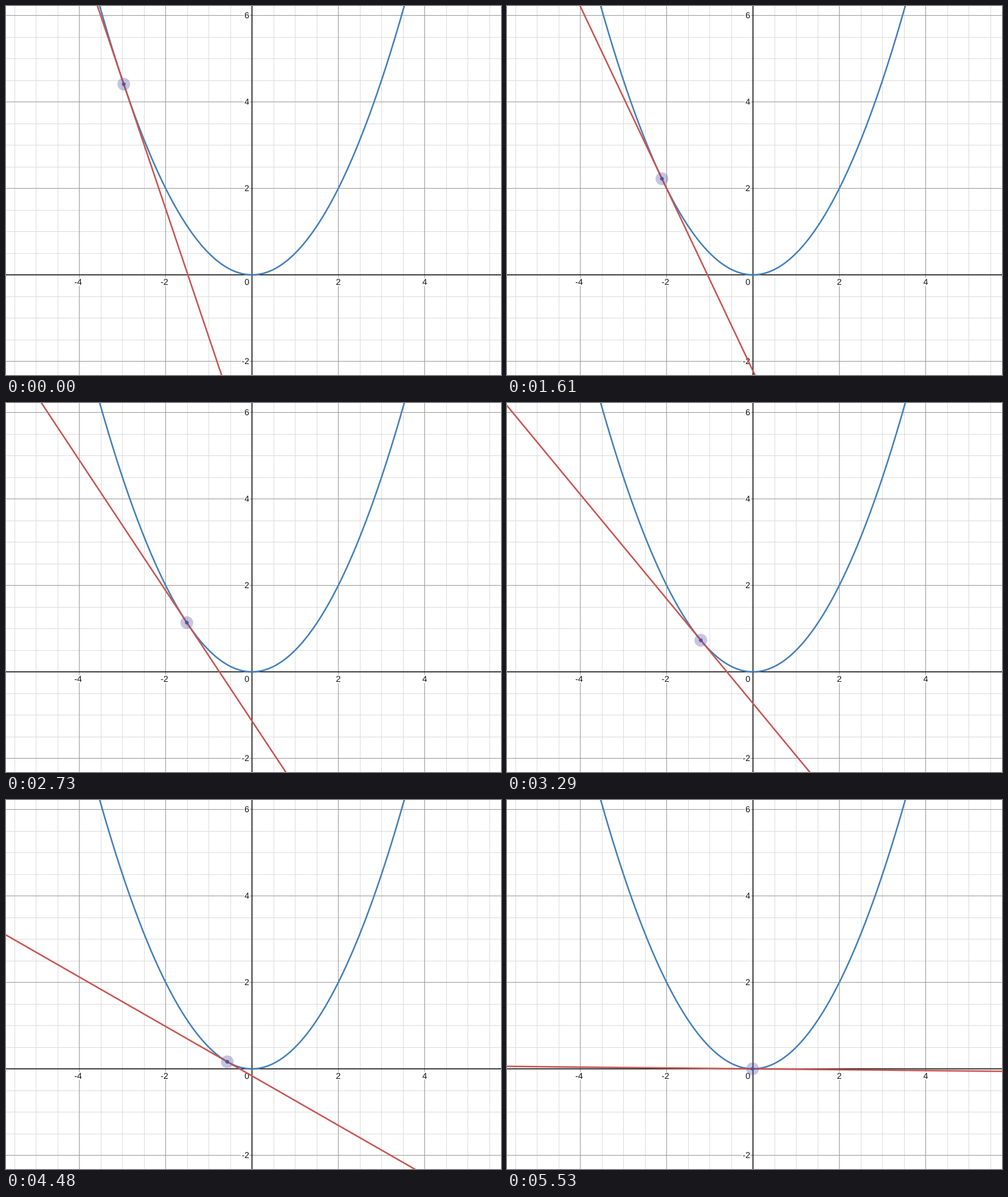
Write a matplotlib script that moves like this. It is 814 px wide and 606 px high and loops after 5600 ms.

```python
import numpy as np
import matplotlib.pyplot as plt
from matplotlib.animation import FuncAnimation
from matplotlib.patches import Circle
from matplotlib.patheffects import withStroke

W, H, DPI = 814, 606, 64
FRAMES, INTERVAL = 80, 70
PX = 72 / DPI                  # one pixel in points
OX, OY, UNIT = 404.5, 441.5, 71
A_START, A_END = -2.97, -0.01  # tangent point, first and last

BLUE, RED, VIOLET = "#427eba", "#c95350", "#54509c"
MINOR, MAJOR = "#dcdcdc", "#999999"


def sx(x):
    return OX + UNIT * x


def sy(y):
    return OY - UNIT * y


def rule(x, y, color, width, z):
    ax.plot(x, y, color=color, lw=width * PX, zorder=z, snap=False,
            solid_capstyle="butt")


def label(x, y, text, align):
    ax.text(x, y, text, ha=align, va="baseline", family="Liberation Sans",
            size=14 * PX, color="#111111", zorder=4,
            path_effects=[withStroke(linewidth=4 * PX, foreground="white")])


def draw_grid():
    for k in range(-12, 13):
        x = np.floor(sx(k / 2)) + 0.5
        y = np.floor(sy(k / 2)) + 0.5
        major = k % 4 == 0
        color, z = (MAJOR, 2) if major else (MINOR, 1)
        rule([x, x], [0, H], color, 1, z)
        rule([0, W], [y, y], color, 1, z)
    rule([OX, OX], [0, H], "black", 1.5, 3)
    rule([0, W], [OY, OY], "black", 1.5, 3)


def draw_labels():
    for v in (-4, -2, 2, 4):
        label(sx(v) - (2 if v < 0 else 0), 458, str(v), "center")
    label(400, 458, "0", "right")
    for v in (-2, 2, 4, 6):
        label(400, sy(v) + 4.5, str(v), "right")


fig = plt.figure(figsize=(W / DPI, H / DPI), dpi=DPI, facecolor="white")
ax = fig.add_axes([0, 0, 1, 1])
ax.set_xlim(0, W)
ax.set_ylim(H, 0)
ax.axis("off")

draw_grid()
draw_labels()

xs = np.linspace(-4, 4, 400)
rule(sx(xs), sy(xs ** 2 / 2), BLUE, 2.5, 5)

tangent, = ax.plot([], [], color=RED, lw=2.5 * PX, zorder=6, snap=False)
halo = Circle((0, 0), 10.5, fc=VIOLET, ec="none", alpha=0.33, zorder=7)
dot = Circle((0, 0), 3.1, fc=VIOLET, ec="none", alpha=0.92, zorder=8)
ax.add_patch(halo)
ax.add_patch(dot)

ends = np.array([-7.0, 7.0])


def update(i):
    a = A_START + (A_END - A_START) * i / (FRAMES - 1)
    tangent.set_data(sx(ends), sy(a * ends - a * a / 2))
    for mark in (halo, dot):
        mark.center = sx(a), sy(a * a / 2)
    return tangent, halo, dot


anim = FuncAnimation(fig, update, frames=FRAMES, interval=INTERVAL,
                     repeat=True, repeat_delay=0)
plt.show()
```
